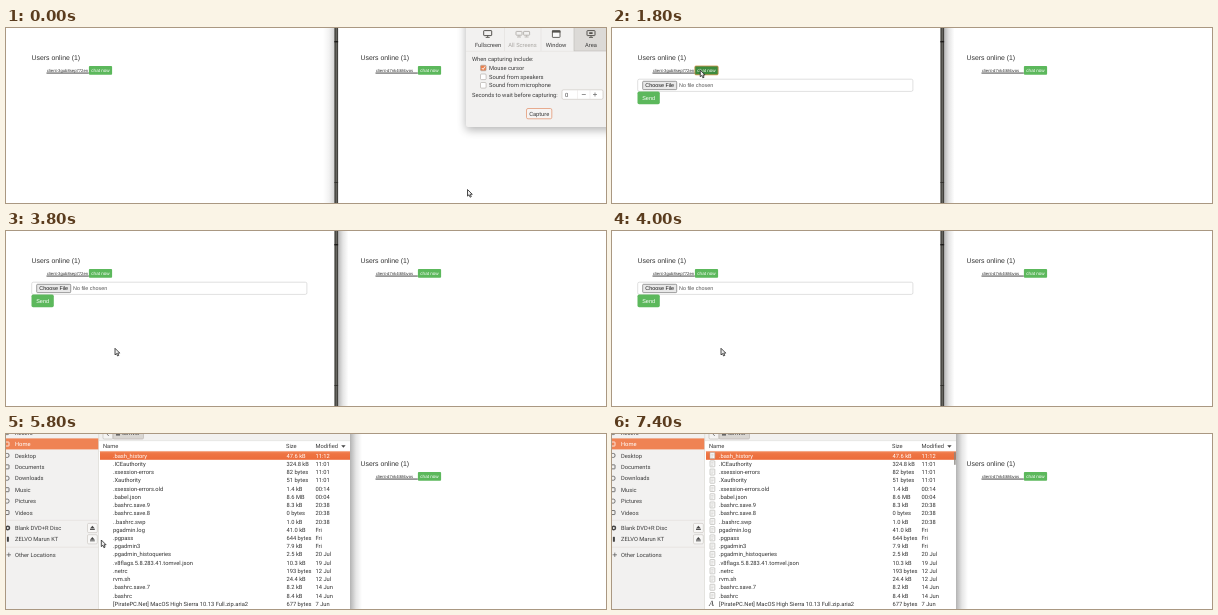
An HTML page for the animation above (8000 ms loop, 600 by 175 pixels).

```html
<!DOCTYPE html>
<html lang="en">
<head>
<meta charset="utf-8">
<title>Peer file transfer</title>
<style>
html, body { margin: 0; width: 100%; height: 100%; overflow: hidden; background: #fff; }
svg { display: block; width: 100vw; height: 100vh; }
text { text-rendering: geometricPrecision; white-space: pre; }
.ui { font-family: Roboto, "Open Sans", sans-serif; font-size: 5.75px; fill: #3c3c3c; }
.web { font-family: "Liberation Sans", Arial, sans-serif; font-size: 5.4px; fill: #333; }
</style>
</head>
<body>
<svg id="stage" viewBox="0 0 600 175" preserveAspectRatio="none">
  <defs>
    <linearGradient id="fadeL"><stop offset="0" stop-color="#000" stop-opacity="0"/><stop offset=".5" stop-color="#000" stop-opacity=".05"/><stop offset="1" stop-color="#000" stop-opacity=".18"/></linearGradient>
    <linearGradient id="fadeR"><stop offset="0" stop-color="#000" stop-opacity=".3"/><stop offset=".5" stop-color="#000" stop-opacity=".1"/><stop offset="1" stop-color="#000" stop-opacity="0"/></linearGradient>
    <linearGradient id="pick" x2="0" y2="1"><stop offset="0" stop-color="#f2885a"/><stop offset=".3" stop-color="#ee7443"/><stop offset="1" stop-color="#ec6c3a"/></linearGradient>
    <filter id="soft" x="-20%" y="-20%" width="140%" height="150%"><feGaussianBlur stdDeviation="5"/></filter>
  </defs>
</svg>
<script>
const LOOP = 8000, STEP = 200;
const stage = document.getElementById('stage');

const rect = (x, y, w, h, fill, extra = '') =>
  `<rect x="${x}" y="${y}" width="${w}" height="${h}" fill="${fill}" ${extra}/>`;
const path = (d, stroke, width = 0.7, fill = 'none') =>
  `<path d="${d}" stroke="${stroke}" stroke-width="${width}" fill="${fill}"/>`;
// y is the middle of the capital letters
const text = (cls, x, y, str, o = {}) => {
  const size = o.size || (cls === 'ui' ? 5.75 : 5.4);
  return `<text class="${cls}" x="${x}" y="${y + size * 0.36}" style="font-size:${size}px;` +
    `${o.fill ? 'fill:' + o.fill : ''}" text-anchor="${o.anchor || 'start'}">${str}</text>`;
};
const ui = (...a) => text('ui', ...a);
const web = (...a) => text('web', ...a);

function layer(html) {
  const g = document.createElementNS('http://www.w3.org/2000/svg', 'g');
  g.innerHTML = html;
  stage.append(g);
  return g;
}
const show = (g, on) => g.setAttribute('display', on ? 'inline' : 'none');

function chatButton(x, fill, ring) {
  return rect(x, 38, 23.2, 8.8, fill, `rx="1" ${ring ? 'stroke="#d09048" stroke-width=".8"' : ''}`) +
    web(x + 11.6, 42.3, 'chat now', { size: 4.6, fill: '#fff', anchor: 'middle' });
}
function userList(x, id) {
  return web(x, 30, 'Users online (1)', { size: 6.9 }) +
    web(x + 15.4, 42.2, id, { size: 4.2 }) +
    rect(x + 15, 44.6, 42.3, 0.9, '#333') +
    chatButton(x + 57.4, '#5cb85c');
}
function checkbox(y, label, on) {
  return rect(474.5, y - 2.8, 5.6, 5.6, on ? '#e9814f' : '#fff', 'rx="1" stroke="#a9a5a0" stroke-width=".6"') +
    (on ? path(`M475.8 ${y}l1.3 1.4 2-3`, '#fff', 0.9) : '') + ui(483, y, label);
}
function monitor(x, y, w, h, color) {
  const mid = x + w / 2;
  return rect(x, y, w, h, 'none', `rx=".5" stroke="${color}" stroke-width="1"`) +
    path(`M${mid} ${y + h}v1.6M${mid - 2} ${y + h + 1.8}h4`, color, 0.9);
}

function captureDialog() {
  const grey = '#55534f', pale = '#b8b5b1';
  return rect(460, -10, 150, 112, '#000', 'opacity=".3" filter="url(#soft)"') +
    rect(460, -5, 145, 104, '#f2f1f0', 'rx="2"') +
    rect(568, -2, 34, 25, '#dcdad7', 'stroke="#bbb8b4" stroke-width=".6"') +
    path('M460 23.3H568M498.5 0V23M535 0V23', '#dedbd8', 0.5) +
    monitor(477.7, 2.6, 8, 5, grey) +
    monitor(510, 3.4, 6, 3.8, pale) + monitor(517.6, 3.4, 6, 3.8, pale) +
    rect(546.4, 2.8, 7.6, 6.6, '#fafafa', `rx=".5" stroke="${grey}" stroke-width=".9"`) +
    rect(546, 2.4, 8.4, 2.2, grey) +
    monitor(581, 2.6, 8, 5, grey) + rect(583.2, 4.2, 3.4, 1.8, grey) +
    ui(482, 17, 'Fullscreen', { anchor: 'middle' }) +
    ui(516.5, 17, 'All Screens', { anchor: 'middle', fill: '#aaa7a3' }) +
    ui(550, 17, 'Window', { anchor: 'middle' }) +
    ui(585, 17, 'Area', { anchor: 'middle' }) +
    ui(466, 31, 'When capturing include:') +
    checkbox(40, 'Mouse cursor', true) +
    checkbox(48.8, 'Sound from speakers') +
    checkbox(57.3, 'Sound from microphone') +
    ui(466, 66.5, 'Seconds to wait before capturing:') +
    rect(556, 61.8, 41, 9.5, '#fff', 'rx="1.5" stroke="#c4c0ba" stroke-width=".6"') +
    ui(559, 66.5, '0') +
    path('M571.5 62V71M584 62V71', '#e6e3e0', 0.5) +
    path('M575.8 66.5H579.8M587 66.5H591M589 64.5V68.5', '#666') +
    rect(520.5, 80.5, 25.3, 10.3, '#f6f4f3', 'rx="1.5" stroke="#e49a76" stroke-width=".8"') +
    ui(533.2, 85.6, 'Capture', { anchor: 'middle' });
}

function sendForm() {
  return rect(25.7, 51.2, 275.2, 12.2, '#fff', 'rx="1.6" stroke="#ccc" stroke-width=".6"') +
    rect(30.7, 53.3, 34, 8.3, '#e9e9e9', 'rx=".8" stroke="#777" stroke-width=".7"') +
    web(47.7, 57.4, 'Choose File', { fill: '#111', anchor: 'middle' }) +
    web(67, 57.4, 'No file chosen', { fill: '#555' }) +
    rect(25.5, 63.6, 22.3, 12.6, '#5cb85c', 'rx="1.6"') +
    web(36.6, 69.9, 'Send', { size: 5.5, fill: '#fff', anchor: 'middle' });
}

const ROWS = [
  ['.bash_history', '47.6 kB', '11:12'],
  ['.ICEauthority', '324.8 kB', '11:01'],
  ['.xsession-errors', '82 bytes', '11:01'],
  ['.Xauthority', '51 bytes', '11:01'],
  ['.xsession-errors.old', '1.4 kB', '00:14'],
  ['.babel.json', '8.6 MB', '00:04'],
  ['.bashrc.save.9', '8.3 kB', '20:38'],
  ['.bashrc.save.8', '0 bytes', '20:38'],
  ['..bashrc.swp', '1.0 kB', '20:38'],
  ['pgadmin.log', '41.0 kB', 'Fri'],
  ['.pgpass', '644 bytes', 'Fri'],
  ['.pgadmin3', '7.9 kB', 'Fri'],
  ['.pgadmin_histoqueries', '2.5 kB', '20 Jul'],
  ['.v8flags.5.8.283.41.tomvel.json', '10.3 kB', '19 Jul'],
  ['.netrc', '193 bytes', '12 Jul'],
  ['rvm.sh', '24.4 kB', '12 Jul'],
  ['.bashrc.save.7', '8.2 kB', '14 Jun'],
  ['.bashrc', '8.4 kB', '14 Jun'],
  ['[PiratePC.Net] MacOS High Sierra 10.13 Full.zip.aria2', '677 bytes', '7 Jun']
];
const rowY = i => 21.6 + i * 8.23;

function eject(y) {
  return rect(81.5, y - 4.6, 9.8, 9.2, '#f8f7f6', 'rx="1.2" stroke="#c6c2bd" stroke-width=".6"') +
    path(`M84 ${y + 0.4}L86.4 ${y - 2.3}L88.8 ${y + 0.4}Z`, 'none', 0, '#444') +
    rect(84, y + 1.1, 4.8, 0.9, '#444');
}
function fileDialog() {
  const places = ['Recent', 'Home', 'Desktop', 'Documents', 'Downloads', 'Music', 'Pictures', 'Videos'];
  let s = rect(344, 0, 12, 175, 'url(#fadeR)') +
    rect(0, 0, 344, 175, '#f2f1f0') +
    rect(93, 7, 240, 168, '#fff') +
    rect(0, 4.4, 92.5, 11, '#ef8354');
  places.forEach((name, i) => {
    const y = -1.4 + i * 11.42, c = i === 1 ? '#fff' : '#555';
    s += ui(9, y, name, { fill: i === 1 ? '#fff' : '' }) +
      rect(-1, y - 2, 4, 4, 'none', `rx="${i % 2 ? 0.5 : 1.6}" stroke="${c}" stroke-width=".8"`);
  });
  s += path('M0 86.3H92.5M0 113.2H92.5', '#dad7d3', 0.5) +
    '<circle cx="1.8" cy="94" r="1.7" fill="none" stroke="#444" stroke-width="1.5"/>' +
    rect(0.9, 102.8, 2, 5, '#444', 'rx=".6"') +
    path('M.6 120.8H5M2.8 118.6V123', '#555') +
    ui(9, 94, 'Blank DVD+R Disc') + ui(9, 105.4, 'ZELVO Marun KT') + ui(9, 120.8, 'Other Locations') +
    eject(94) + eject(105.3) +
    path('M92.7 0V175', '#d6d3cf', 0.6) +
    rect(97, -6, 10, 11, '#f5f4f3', 'rx="1.2" stroke="#bdb9b4" stroke-width=".6"') +
    rect(107, -6, 30.5, 11, '#d9d6d2', 'rx="1.2" stroke="#b5b1ac" stroke-width=".6"') +
    path('M102.8 -2L101 0L102.8 2', '#555') +
    rect(110, -3, 4, 4.6, '#666') + ui(116, -0.6, 'tomvel') +
    path('M93 7H344', '#cfccc8', 0.5);
  return s;
}
function emptyList() {
  return path('M93 17.4H333', '#e4e2df', 0.5) + path('M333.2 7V175', '#e2dfdc', 0.5) +
    ui(97, 12.3, 'Name') + ui(291, 12.3, 'Size') + ui(306.5, 12.3, 'Modified') +
    path('M331.5 11.4h1.5', '#777', 0.6);
}
function fullList() {
  let s = rect(93, 7.2, 251, 168, '#fff') + path('M93 17.2H344', '#e9e7e4', 0.5) +
    ui(97, 12.3, 'Name') + ui(280, 12.3, 'Size') + ui(309.5, 12.3, 'Modified') +
    path('M335.2 11.2h4.4l-2.2 2.6z', 'none', 0, '#444') +
    rect(94, 17.3, 250, 8.5, 'url(#pick)');
  ROWS.forEach((cells, i) => {
    const o = { fill: i ? '#333' : '#fff' };
    s += ui(107, rowY(i), cells[0], o) + ui(280.5, rowY(i), cells[1], o) + ui(309.5, rowY(i), cells[2], o);
  });
  return s;
}
function fileIcon(i) {
  const y = rowY(i);
  if (i === ROWS.length - 1)
    return `<text x="97" y="${y + 2.6}" font-family="Liberation Serif, serif" font-style="italic" font-size="8" fill="#333">A</text>`;
  return rect(98, y - 3, 4.8, 6, '#fafafa', 'rx=".5" stroke="#aeaba6" stroke-width=".6"') +
    path(`M99.2 ${y - 1.2}h2.4M99.2 ${y + 0.2}h2.4M99.2 ${y + 1.6}h1.6`, '#bfbcb7', 0.5);
}

layer(rect(0, 0, 600, 175, '#fff'));
const shadeWide = layer(rect(317, 0, 12, 175, 'url(#fadeL)'));
const shadeThin = layer(rect(324, 0, 5, 175, 'url(#fadeL)'));
const shadeRight = layer(rect(331.5, 0, 11, 175, 'url(#fadeR)'));
layer(rect(328.4, 0, 3.7, 175, '#42413d') + rect(329.8, 0, 0.9, 175, '#77756f') +
  rect(328.4, 13, 3.7, 1.4, '#1d1c1a') + rect(328.4, 154, 3.7, 0.8, '#2c2b27'));
layer(userList(25.5, 'client-3gub8sep772en') + userList(354.5, 'client-d7nk4t6hbvos'));
const pressed = layer(chatButton(82.9, '#3d8b3d', true));
const form = layer(sendForm());
const tip = layer(rect(71, 68, 46, 12, '#000', 'opacity=".18" rx="2"') +
  rect(72, 68, 43.7, 10.8, '#242424', 'rx="1"') + ui(75.2, 73.4, 'No file chosen', { fill: '#fff' }));
const capture = layer(captureDialog());
const files = layer(fileDialog());
const blank = layer(emptyList());
const list = layer(fullList());
const icons = layer(ROWS.map((_, i) => fileIcon(i)).join('') +
  rect(342.2, 18, 1.4, 13, '#8a8782', 'rx=".7"'));
const arrow = layer(path('M0 0V6.6L1.5 5.3L2.6 7.7L3.8 7.1L2.7 4.8H4.8Z', '#222', 0.8, '#eee'));
const hand = layer(path('M0 .4Q.9 -.4 1.6 .6L2.4 2.6L4.6 3Q5.8 3.3 5.6 4.8L5 7.4H2L-.6 4.6Q-.5 3.6 .9 4Z', '#222', 0.7, '#fff'));

// time, x, y of the pointer tip
const TRACK = [
  [0, 461.5, 161.5], [1000, 94.5, 39.5], [1600, 94.5, 39.5], [2400, 54.5, 56.5],
  [2600, 54.5, 56.5], [3600, 109, 117.3], [4000, 109, 117.3], [5000, 95.3, 106],
  [6400, 95.3, 106], [7400, 210, 178], [LOOP, 210, 178]
];
function pointer(t) {
  const k = Math.max(1, TRACK.findIndex(p => p[0] > t));
  const [t0, x0, y0] = TRACK[k - 1], [t1, x1, y1] = TRACK[k];
  const u = (t - t0) / (t1 - t0), e = u * u * (3 - 2 * u);
  return [x0 + (x1 - x0) * e, y0 + (y1 - y0) * e];
}

function draw(ms) {
  const t = Math.floor((ms % LOOP) / STEP) * STEP;
  const within = (a, b) => t >= a && t < b;
  show(capture, t < 200);
  show(shadeWide, t < 200);
  show(shadeThin, within(200, 1400));
  show(shadeRight, t >= 1400);
  show(pressed, within(1400, 2800));
  show(form, t >= 1600);
  show(tip, within(2600, 2800));
  show(files, t >= 4200);
  show(blank, within(4200, 5800));
  show(list, t >= 5800);
  show(icons, t >= 6000);
  const onLink = within(1000, 1800), [x, y] = pointer(t);
  show(hand, onLink);
  show(arrow, !onLink);
  for (const g of [hand, arrow]) g.setAttribute('transform', `translate(${x} ${y})`);
}

function tick(now) {
  draw(now);
  requestAnimationFrame(tick);
}
draw(0);
requestAnimationFrame(tick);
</script>
</body>
</html>
```
